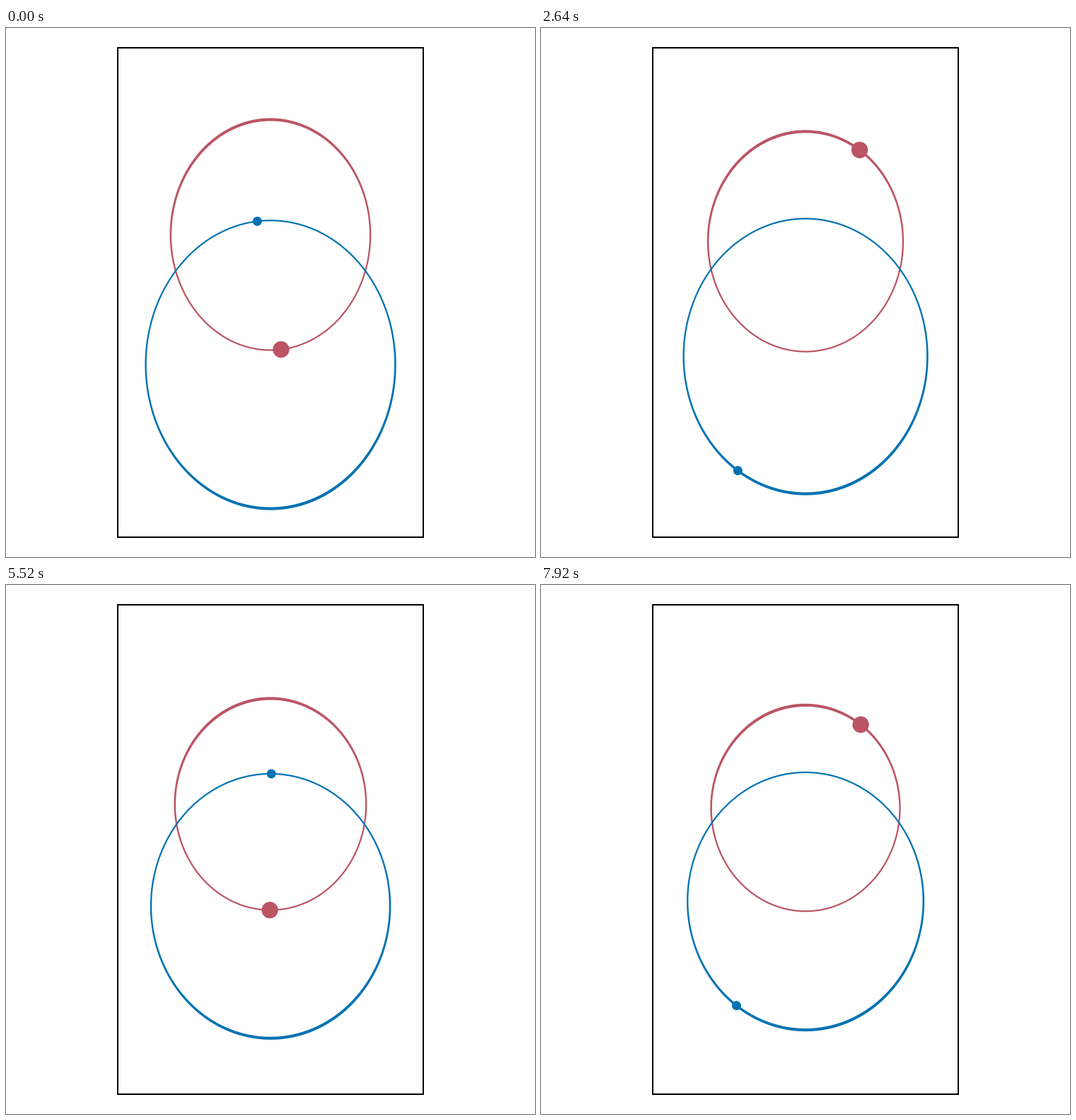
A matplotlib script for the animation above (8000 ms loop, 748 by 748 pixels).

```python
import matplotlib.pyplot as plt
import numpy as np
from matplotlib.animation import FuncAnimation
from matplotlib.patches import Circle, Polygon, Rectangle

SIZE, DPI = 748, 100
MID = SIZE / 2
RED, BLUE = "#bb5566", "#0072b2"
INTERVAL, FRAMES = 40, 200
HOLD = 3  # the picture changes on every third tick

# Angle from closest approach (degrees) and its rate at a few times (seconds)
TIMES = np.array([0, 1.56, 2.64, 4.56, 5.52, 6.84, 7.92])
ANGLES = np.array([10.5, 104.4, 159.2, 287.7, 359.4, 452.1, 516.15])
RATES = np.array([67, 53, 53, 75, 75, 63, 58])


def angle_at(t):
    """Cubic Hermite interpolation of the orbital angle, in radians."""
    i = min(np.searchsorted(TIMES, t, side="right") - 1, len(TIMES) - 2)
    h = TIMES[i + 1] - TIMES[i]
    u = (t - TIMES[i]) / h
    f = ((1 + 2 * u) * (1 - u) ** 2 * ANGLES[i]
         + u * (1 - u) ** 2 * h * RATES[i]
         + u * u * (3 - 2 * u) * ANGLES[i + 1]
         + u * u * (u - 1) * h * RATES[i + 1])
    return np.radians(f)


def eccentricity(t):
    return 0.5 * np.exp(-(0.0297 - 0.000235 * t) * t)


class Body:
    """A dot on a shrinking ellipse with one focus at the stage centre."""

    def __init__(self, ax, param, side, radius, color, z):
        self.param = param  # semi-latus rectum, constant in time
        self.side = side    # +1: closest point below the centre, -1: above
        self.ring = Polygon([(0, 0), (1, 0), (0, 1)], closed=True,
                            facecolor=color, edgecolor="none", zorder=z)
        self.dot = Circle((MID, MID), radius, facecolor=color,
                          edgecolor="none", zorder=z + 2)
        ax.add_patch(self.ring)
        ax.add_patch(self.dot)

    def place(self, x, y):
        return np.column_stack([MID + self.side * x, MID + self.side * y])

    def update(self, ecc, angle):
        a = self.param / (1 - ecc ** 2)
        b = self.param / np.sqrt(1 - ecc ** 2)
        s = np.linspace(0, 2 * np.pi, 361)
        x, y = b * np.sin(s), a * (np.cos(s) - ecc)

        # The stroke swells around the far end of the orbit
        half = 1.1 + ((1 - np.cos(s - 0.17)) / 2) ** 3
        nx, ny = a * np.sin(s), b * np.cos(s)
        norm = np.hypot(nx, ny)
        dx, dy = half * nx / norm, half * ny / norm
        outer = self.place(x + dx, y + dy)
        inner = self.place(x - dx, y - dy)
        self.ring.set_xy(np.vstack([outer, inner[::-1]]))

        r = self.param / (1 + ecc * np.cos(angle))
        self.dot.center = (MID + self.side * r * np.sin(angle),
                           MID + self.side * r * np.cos(angle))


fig = plt.figure(figsize=(SIZE / DPI, SIZE / DPI), dpi=DPI, facecolor="white")
ax = fig.add_axes([0, 0, 1, 1])
ax.set_xlim(0, SIZE)
ax.set_ylim(SIZE, 0)
ax.axis("off")
ax.add_patch(Rectangle((158, 28.2), 432.5, 692, fill=False, edgecolor="black",
                       linewidth=2 * 72 / DPI, joinstyle="miter", zorder=1))

bodies = [
    Body(ax, 122.25, 1, 11.7, RED, 2),
    Body(ax, 152.8, -1, 6.5, BLUE, 3),
]


def draw(i):
    t = i // HOLD * HOLD * INTERVAL / 1000
    for body in bodies:
        body.update(eccentricity(t), angle_at(t))
    return [p for body in bodies for p in (body.ring, body.dot)]


anim = FuncAnimation(fig, draw, frames=FRAMES, init_func=lambda: draw(0),
                     interval=INTERVAL, repeat=True, repeat_delay=0)
plt.show()
```
